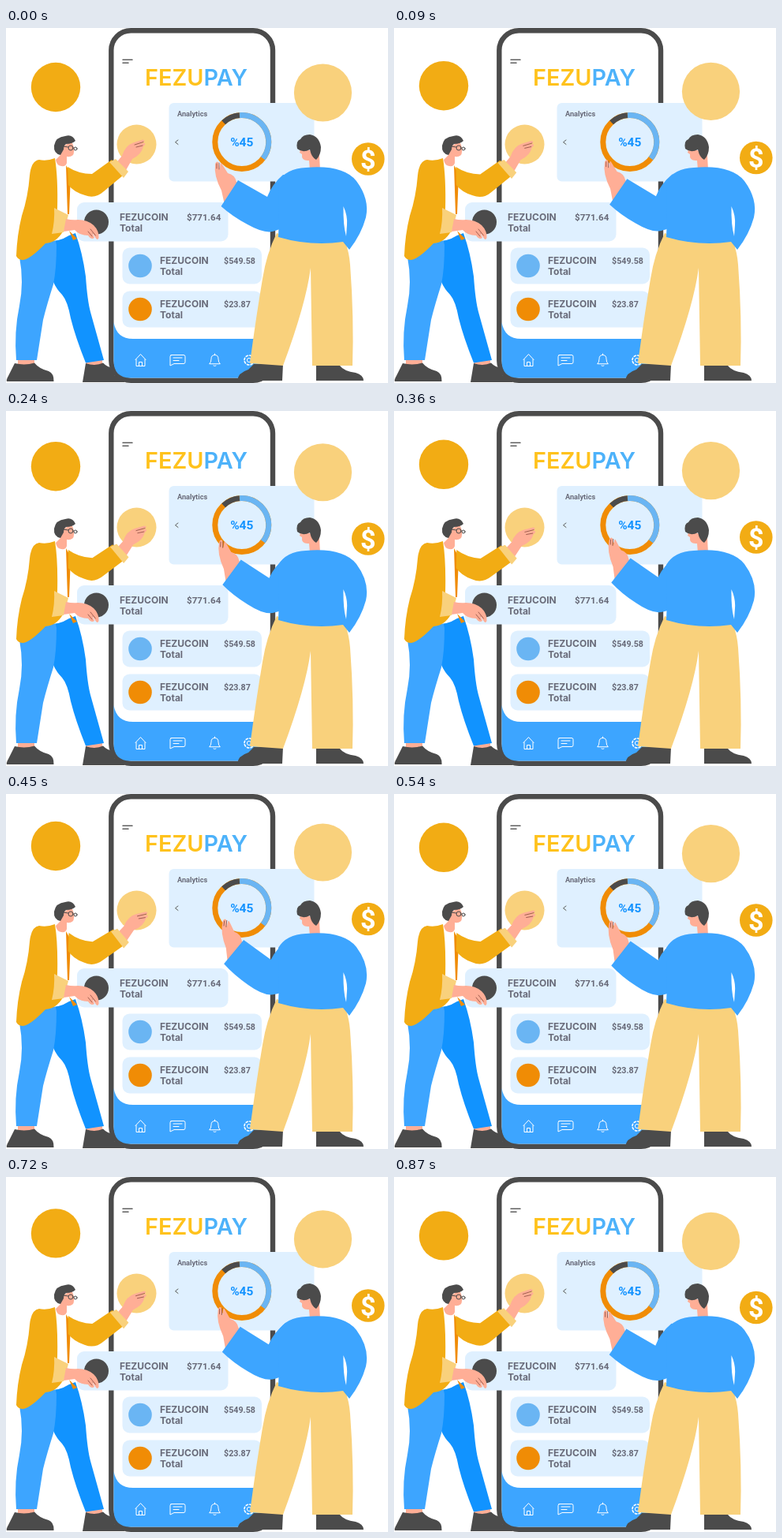
These frames come from a looping animation (484x450 px, 0.9 s). An HTML page:

```html
<!DOCTYPE html>
<html lang="en">
<head>
<meta charset="utf-8">
<title>Payment app</title>
<style>
  html, body { margin: 0; width: 100%; height: 100%; overflow: hidden; background: #fff; }
  svg { display: block; width: 484px; height: 450px; }
  text { font-family: Roboto, sans-serif; font-weight: 700; fill: #686a78; }
  .name { font: 700 12px Inter, sans-serif; }
  .dark { fill: #4b4b4b; }
  .skin { fill: #ffae96; }
  .blue { fill: #3da5ff; }
  .gold { fill: #f2ac14; }
  .sand { fill: #f9d17c; }
  .orange { fill: #f08c05; }
  .card { fill: #dff0ff; }
  .line { fill: none; stroke-linecap: round; stroke-linejoin: round; }
</style>
</head>
<body>
<svg viewBox="0 0 484 450">
  <!-- phone -->
  <rect x="133.3" y="3.2" width="204.7" height="443.5" rx="25" fill="#fff" stroke="#4b4b4b" stroke-width="6.4"/>
  <path class="blue" d="M136.5 373Q140 394 161 394H313Q332 394 334.8 373V423Q334.8 443.5 314 443.5H158Q136.5 443.5 136.5 422Z"/>
  <path class="line" stroke="#606060" stroke-width="1.5" d="M148 40.3H160M148 44.3H155"/>
  <g class="line" stroke="#fff">
    <path d="M164 420.5L170.5 413.5L177 420.5M165 420V428.5H176V420M168.5 428.5V423.5H172.5V428.5"/>
    <path d="M209 414.5H225Q227 414.5 227 416.5V423.5Q227 425.5 225 425.5H213L208 428V416.5Q208 414.5 210 414.5M212 418H223M212 421.5H219"/>
    <path d="M258 425.5Q260 424 260 419.5Q260 414.5 264.5 414.5T269 419.5Q269 424 271 425.5ZM264.5 414.5V413M263 428Q264.5 429 266 428"/>
    <circle cx="308" cy="421" r="2.6"/>
    <circle cx="308" cy="421" r="6" stroke-width="1.6" stroke-dasharray="2.4 2.3"/>
  </g>
  <text x="241" y="73" text-anchor="middle" style="font: 600 28.8px Inter, sans-serif; fill: #ffc21c">FEZU<tspan fill="#4db2fa">PAY</tspan></text>

  <!-- analytics -->
  <rect class="card" x="206.5" y="95" width="184" height="99.5" rx="6"/>
  <text x="217" y="112.3" font-size="9.2">Analytics</text>
  <path class="line" stroke="#5a5a5a" d="M218 142L214.5 144.7L218 147.5"/>
  <g class="line" style="stroke-linecap: butt" stroke-width="7" transform="translate(298.8 144.5)">
    <circle r="34" stroke="#f08c05"/>
    <path stroke="#6ab5f3" d="M-2.96 -33.87A34 34 0 0 1 26.8 20.9"/>
    <path stroke="#4b4b4b" d="M-23.2 -24.8A34 34 0 0 1 -2.96 -33.87"/>
  </g>
  <text x="298.8" y="150" font-size="15.5" text-anchor="middle" style="fill: #1493ff">%45</text>

  <!-- balances -->
  <rect class="card" x="90" y="221" width="191.5" height="49.5" rx="9"/>
  <circle class="dark" cx="114.5" cy="246" r="15.5"/>
  <text class="name" x="144" y="244.3">FEZUCOIN</text>
  <text class="name" x="144" y="258.3">Total</text>
  <text x="229" y="243.7" font-size="11.6">$771.64</text>

  <rect class="card" x="147.5" y="278.5" width="176.5" height="46" rx="9"/>
  <circle cx="170" cy="301.5" r="14.8" fill="#6ab5f3"/>
  <text class="name" x="195" y="299.3">FEZUCOIN</text>
  <text class="name" x="195" y="313.3">Total</text>
  <text x="276" y="299.3" font-size="10.7">$549.58</text>

  <rect class="card" x="147.5" y="333.5" width="176.5" height="46" rx="9"/>
  <circle class="orange" cx="170" cy="356.5" r="14.8"/>
  <text class="name" x="195" y="354.3">FEZUCOIN</text>
  <text class="name" x="195" y="367.7">Total</text>
  <text x="276" y="354" font-size="10.7">$23.87</text>

  <circle class="sand" cx="165.5" cy="147.5" r="25"/>

  <!-- left figure -->
  <g>
    <path class="skin" d="M100 418H122V428H102ZM15 418H36V428H15Z"/>
    <path class="dark" d="M1 448Q0 446 3 441L11 425Q24 428 36 424.5Q42 432 54 435Q61 438 60.500 448ZM97 449L101 425Q113 429 123 424.500Q128 430 137 431V440L150 444V449Z"/>
    <path d="M61 270L88 260Q97 285 101 315Q103 345 107 360L124 421L101 424.500Q88 392 82 368Q78 346 71 338Q64 331 60 322Z" fill="#1193ff"/>
    <path class="blue" d="M17 290L62 266L64 275Q64 305 60 325Q52 350 47 370L39 421H13Q10 385 17 352Q23 322 17 290Z"/>
    <path d="M62 172L77 174L84 259Q72 271 55 270Z" fill="#fff"/>
    <path class="orange" d="M76 174L82 185L80 236H78ZM80 257L90 267L85 269Z"/>
    <path class="gold" d="M42 167Q52 169 62 165Q66 190 65 230L72 258Q64 272 50 273Q32 292 22 294Q15 294 13 289Q14 262 20 238Q28 214 30 187Q32 168 42 167Z"/>
    <path class="sand" d="M61 228L79 237L73 259L58 261Q62 245 61 228Z"/>
    <path class="skin" d="M76 242Q84 244 91 243Q103 243 111 250Q118 257 117.500 266Q116 270 113.500 266L109 259L112 266Q108 269 104 263Q93 263 87 256L73 258Z"/>
    <path class="line" stroke="#8a4b40" stroke-width=".8" d="M107 255L113.500 263M104 258L109 264"/>
    <path class="skin" d="M68 152L83 144Q87 151 86 157Q86 164 77 163V171Q76 176 70 175Q64 174 63 167L69 161Z"/>
    <path class="dark" d="M69 161Q60 159 61 149Q63 138 75 137Q84 134 88 143Q84 147 76 147Q73 149 73 154Z"/>
    <g class="line" stroke="#4b4b4b">
      <circle cx="82" cy="152" r="3"/>
      <circle cx="88" cy="153" r="2"/>
      <path d="M72 150L79 151"/>
    </g>
    <g id="leftArm">
      <path class="skin" d="M138 173L147 162Q151 149 161 145.500L173 141.500Q177 142 174.500 144.500L169 147L175 145.500Q178 147 174 150Q172 160 160 166L151 182Z"/>
      <path class="line" stroke="#8a4b40" stroke-width=".8" d="M163 148L174 144.500M165 151L173 149"/>
      <path class="gold" d="M78 176Q92 185 109 185L134 167L148 187L124 207Q113 217 100 212Q86 208 79 199Z"/>
      <path class="sand" d="M131 170L139 166L155 182L149 190Z"/>
    </g>
  </g>

  <!-- right figure -->
  <g>
    <path class="dark" d="M293 447Q294 437 307 433L314 426H351L350 447ZM393 447V428H423Q428 435 443 437Q453 440 453 447Z"/>
    <path class="sand" d="M343 260Q385 276 429 268Q435 285 436 300Q441 368 439 428H388L386 304Q380 350 351 428L309 425Q317 365 325 318Q330 286 343 260Z"/>
    <path class="skin" d="M374 150L372 158L375 160Q374 169 384 168L385 180H398L397 161Z"/>
    <path class="dark" d="M369 153Q367 143 373 141Q376 135 385 135Q397 137 399 151Q399 161 393 167Q387 164 385 154Q376 159 369 153Z"/>
    <g id="rightArm">
      <path class="skin" d="M277 224L273 206Q263 187 265 173Q266 168 269 170L271 180Q271 167 274 173L281 184Q290 186 292 195L299 198Z"/>
      <path class="line" stroke="#8a4b40" stroke-width=".8" d="M267 172V178M270 171V179"/>
      <path class="blue" d="M294 193L331 214Q337 198 351 186L380 190L371 236Q353 254 341 257Q329 262 306 249Q287 239 272.500 226Z"/>
    </g>
    <path class="blue" d="M345 195Q355 178 380 177Q427 173 444 194Q461 217 456 240Q450 262 435 281L427 271Q386 277 345 265L346 240Z"/>
    <path d="M427.500 226Q433 238 432 250L431 264Q427 250 427.500 226Z" fill="#fff"/>
  </g>

  <!-- floating coins -->
  <circle id="goldCoin" class="gold" cx="63" cy="75" r="31.2"/>
  <circle id="sandCoin" class="sand" cx="401.5" cy="82" r="36.6"/>
  <g id="dollarCoin">
    <circle class="gold" cx="458.8" cy="166" r="20.8"/>
    <text x="458.8" y="177.5" font-size="34" text-anchor="middle" style="fill: #fff">$</text>
  </g>
</svg>
<script>
  const LOOP = 900, STEP = 30;
  const set = (id, transform) => document.getElementById(id).setAttribute('transform', transform);

  function draw() {
    const time = Math.floor(performance.now() % LOOP / STEP) * STEP;
    const lift = 1 - Math.abs(2 * time / LOOP - 1);
    set('goldCoin', `translate(0 ${-9 * lift})`);
    set('sandCoin', `translate(0 ${-8 * lift})`);
    set('dollarCoin', `translate(0 ${-7.5 * lift})`);
    set('leftArm', `rotate(${4.6 * lift} 80 195)`);
    set('rightArm', `rotate(${6.4 * lift} 370 253)`);
    requestAnimationFrame(draw);
  }
  draw();
</script>
</body>
</html>
```
